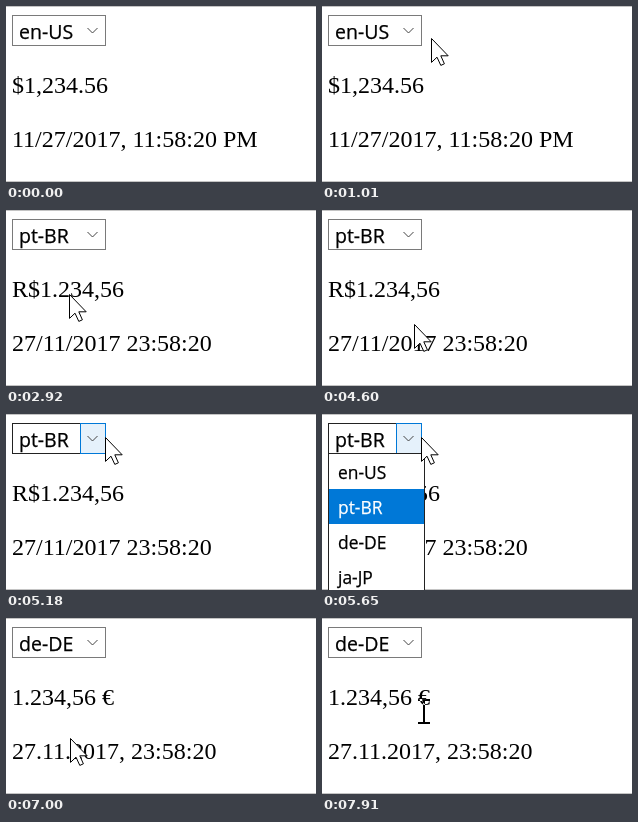
An HTML page for the animation above (7.99 s loop, 310 by 176 pixels).

```html
<!DOCTYPE html>
<html lang="en">
<head>
<meta charset="utf-8">
<title>Locale picker</title>
<style>
  html, body { margin: 0; width: 100%; height: 100%; overflow: hidden; background: #fff; }
  svg { display: block; width: 310px; height: 176px; background: #fff; }
  .page { font: 24px "Liberation Serif", "Times New Roman", serif; }
  .ui { font: 19.5px "Open Sans", "Noto Sans", sans-serif; }
  .ui text { stroke: currentColor; stroke-width: .25px; }
  .list { font-size: 17.4px; }
  .list text { fill: currentColor; }
  .ibeam { mix-blend-mode: difference; }
</style>
</head>
<body>
<svg viewBox="0 0 310 176">
  <rect width="310" height="176" fill="#fff"/>
  <path d="M0 .5H310M0 175.5H310" stroke="#c4c4c4"/>
  <g class="page">
    <text id="money" x="6" y="87"></text>
    <text id="date" x="6" y="141"></text>
  </g>
  <g class="ui">
    <rect id="box" x="6.5" y="9.5" width="93" height="30" fill="#fff"/>
    <rect id="button" x="74.5" y="9.5" width="25" height="30" stroke="#0078d7"/>
    <path d="M81.5 22l5 5 5-5" fill="none" stroke="#444"/>
    <text id="value" x="13" y="33"></text>
    <g id="list" class="list">
      <rect x="6.5" y="39.5" width="96" height="150" fill="#fff" stroke="#222"/>
      <rect id="mark" x="7" width="95" height="35" fill="#0078d7"/>
    </g>
  </g>
  <path id="arrow" d="M.5 .5V24.4L6 19.2 9.8 27.4 13.4 25.8 9.8 17.8H17.2Z" fill="#fff" stroke="#000"/>
  <path id="ibeam" class="ibeam" d="M-6-11H6M0-10V11M-6 12H6" fill="none" stroke="#fff" stroke-width="2"/>
</svg>
<script>
const LOOP = 7990, TICK = 72, ROW = 35, LIST_TOP = 40;
const $ = id => document.getElementById(id);
const show = (el, on) => el.setAttribute('visibility', on ? 'visible' : 'hidden');

const locales = [
  ['en-US', '$1,234.56', '11/27/2017, 11:58:20 PM'],
  ['pt-BR', 'R$1.234,56', '27/11/2017 23:58:20'],
  ['de-DE', '1.234,56 €', '27.11.2017, 23:58:20'],
  ['ja-JP']
];

const options = locales.map(([name], i) => {
  const text = document.createElementNS('http://www.w3.org/2000/svg', 'text');
  text.setAttribute('x', 16);
  text.setAttribute('y', LIST_TOP + 25 + ROW * i);
  text.textContent = name;
  $('list').append(text);
  return text;
});

// Each move starts where the last one ended; "via" bends its path
const entry = [226, 119];
const moves = [
  { from: 290, to: 1090, at: [86, 15] },
  { from: 2000, to: 2220, at: [63, 84], via: [64, 90] },
  { from: 3990, to: 4290, at: [67, 113] },
  { from: 4520, to: 5040, at: [99, 23], via: [128, 130] },
  { from: 5940, to: 6160, at: [67, 114] },
  { from: 6320, to: 6380, at: [64, 120] },
  { from: 7690, to: 7910, at: [102, 93] }
];

// The list is open for a while, then the next locale is chosen
const picks = [{ open: 1710, close: 2920 }, { open: 5650, close: 7000 }];

function pointer(t) {
  const i = moves.filter(m => t >= m.from).length - 1;
  if (i < 0) return null;
  const { from, to, at, via } = moves[i];
  const start = i ? moves[i - 1].at : entry;
  const gaps = Math.round((to - from) / TICK);
  const step = Math.floor((t - from + 5) * gaps / (to - from));
  const u = Math.min(1, (step + 1) / (gaps + 1)), v = 1 - u;
  return start.map((a, k) => {
    const mid = via ? via[k] : (a + at[k]) / 2;
    return Math.round(v * v * a + 2 * u * v * mid + u * u * at[k]);
  });
}

function draw() {
  const t = performance.now() % LOOP;
  const p = pointer(t);
  const [x, y] = p || entry;
  const open = picks.some(k => t >= k.open && t < k.close);
  const pressed = picks.some(k => t >= k.open - 80 && t < k.open);
  const hot = open || (x < 100 && y < LIST_TOP);

  const chosen = picks.filter(k => t >= k.close).length;
  ['value', 'money', 'date'].forEach((id, i) => $(id).textContent = locales[chosen][i]);

  $('box').setAttribute('stroke', hot ? '#222' : '#7a7a7a');
  $('button').setAttribute('fill', pressed ? '#cce4f7' : '#e5f1fb');
  show($('button'), hot);

  const row = y < LIST_TOP ? chosen : Math.floor((y - LIST_TOP) / ROW);
  show($('list'), open);
  $('mark').setAttribute('y', LIST_TOP + ROW * row);
  options.forEach((o, i) => o.style.color = i === row ? '#fff' : '#000');

  // The lower edge of the amount turns the pointer into a text cursor
  const overText = !open && x < 106 && y > 85 && y < 96;
  show($('arrow'), p && !overText);
  show($('ibeam'), p && overText);
  $(overText ? 'ibeam' : 'arrow').setAttribute('transform', `translate(${x} ${y})`);
  requestAnimationFrame(draw);
}
draw();
</script>
</body>
</html>
```
